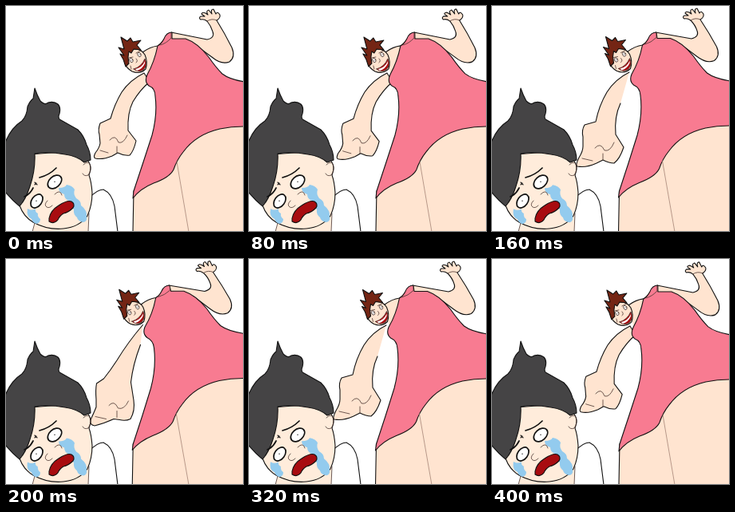
Write an HTML page that moves like this. It is 297 by 282 pixels and loops after 0.48 s.

```html
<!DOCTYPE html>
<html lang="en">
<head>
<meta charset="utf-8">
<style>
html, body { margin: 0; width: 100%; height: 100%; overflow: hidden; background: #fff; }
svg { display: block; width: 100vw; height: 100vh; }
path, ellipse { stroke: #111; stroke-width: 1.1; stroke-linejoin: round; stroke-linecap: round; fill: none; }
.skin { fill: #ffe4d0; }
.pale { fill: #ffecdb; }
.dress { fill: #f87b91; }
.hair { fill: #454445; }
.spikes { fill: #742514; }
.white { fill: #fff; }
.mouth { fill: #a80c10; }
.tear { fill: #93cbee; }
.thin { stroke-width: .8; stroke: #4a3530; }
.soft { stroke-width: .7; stroke: #98786a; }
.flat { stroke: none; }
.bold { stroke-width: 1.7; }
</style>
</head>
<body>
<svg viewBox="0 0 297 282" preserveAspectRatio="none">
  <g id="woman"></g>
  <g id="head">
    <path class="skin" d="M150 58L149 72Q151 78 158 82Q168 86 175 79Q178 70 174 61Q169 53 160 54Z"/>
    <path class="spikes" d="M150 76L147 67L143 60L148 62L141 52L148 54L144 39L152 44L156 40L159 45L169 43L164 49L169 55L160 54L157 59L154 57L153 64L154 72Z"/>
    <path class="mouth thin" d="M160 79Q170 76 174 66Q178 74 172 80Q166 84 160 79Z"/>
    <path class="white flat" d="M162 79Q171 77 174 69L174 72Q171 79 164 81Z"/>
    <ellipse class="white thin" cx="157" cy="68" rx="2" ry="2.8" transform="rotate(-28 157 68)"/>
    <ellipse class="white thin" cx="167" cy="61" rx="2" ry="2.8" transform="rotate(-28 167 61)"/>
    <path class="thin" d="M154 65L159 64M163 59L169 56M163 66Q166 69 163 71M157 68v.3M167 61v.3M156 75L157 79"/>
  </g>
  <g id="man">
    <path class="white" d="M104 241Q114 230 122 230Q133 235 136 251L140 283H101Z"/>
    <path class="pale flat" d="M36 270L33 283H103L104 258Z"/>
    <path class="thin" d="M36 272L33 283M104 260L103 283"/>
    <path class="pale" d="M30 186L17 250Q22 264 34 271Q52 281 72 279Q92 277 102 263Q108 250 108 234Q107 220 104 212Q108 202 104 196L94 181Z"/>
    <path class="thin" d="M97 199Q102 194 105 198Q108 205 103 212Q98 214 96 210"/>
    <path class="hair" d="M-1 171Q6 153 20 144Q26 138 27 126Q30 119 34 116L36 103Q39 112 43 119Q49 125 53 121Q60 119 65 123Q69 127 67 135Q65 139 67 142L90 155Q98 163 101 174Q106 183 106 193L98 196Q89 188 74 186Q53 182 36 185Q37 206 30 226Q25 242 17 251Q8 244-1 233Z"/>
    <g id="tears">
      <path class="tear flat" d="M66 228Q74 228 76 224Q83 225 86 230Q84 236 88 241Q94 244 94 250Q102 256 101 264Q102 270 97 271Q90 270 89 265Q84 261 85 255Q80 250 79 244Q73 242 73 236Q66 234 66 228Z"/>
      <path class="tear flat" d="M27 254Q32 257 37 254Q36 258 40 260Q39 264 43 267Q43 272 38 273Q33 271 32 267Q25 264 27 254Z"/>
    </g>
    <ellipse class="white bold" cx="61" cy="220.500" rx="6.800" ry="10" transform="rotate(48 61 220.500)"/>
    <ellipse class="white bold" cx="38.500" cy="244.500" rx="6.300" ry="9.500" transform="rotate(36 38.500 244.500)"/>
    <path class="bold" d="M42 215Q54 212 63 203M23 239Q30 236 34 228"/>
    <path d="M36 221L39 224M36 224L38 222M61 220v.4M38 244v.4"/>
    <path class="thin" d="M61 236Q68 229 70 237M52 244Q47 249 51 252Q54 254 58 250"/>
    <path class="mouth" d="M54 266Q56 256 66 250Q77 243 82 245Q87 248 84 253Q78 259 72 260Q67 263 65 268Q60 274 54 270Z"/>
  </g>
</svg>
<script>
// Each part: class, then its poses from pulled back to full punch.
const parts = [
  ["skin",
    "M207 33Q232 38 252 42Q262 40 259 32Q257 25 252 19Q248 16 244 17Q241 15 244 13L249 13L245 10Q246 7 250 9L253 11Q250 6 254 5L258 10Q256 4 260 4L263 10Q265 6 268 11Q269 15 264 18Q274 34 283 52Q288 64 280 70Q270 74 258 64L236 48L207 41Z",
    "M203 33Q229 37 248 40Q258 37 255 30Q252 22 246 17Q241 14 238 15Q235 13 238 11L243 11L239 8Q240 5 244 7L247 9Q244 4 248 3L252 8Q250 2 254 2L257 8Q259 4 262 9Q263 13 258 16Q270 33 280 50Q285 61 277 67Q267 71 255 62L234 46L205 40Z"],
  ["skin flat",
    "M171 58Q181 51 190 50L202 36V65L179 92Z",
    "M168 57Q178 49 187 48L199 35V65L176 90Z"],
  ["", "M171 58Q181 51 190 50Q197 46 202 36", "M168 57Q178 49 187 48Q194 45 199 35"],
  ["skin",
    "M173 84Q155 93 145 108Q136 123 131 141L118 147Q115 155 117 161L118 172Q117 178 112 184Q109 190 112 191Q121 193 133 188L140 184Q148 188 155 187Q160 182 163 169L153 156Q152 134 159 120Q168 105 180 95Z",
    "M172 83Q154 92 144 108Q134 125 130 145L116 149Q112 156 114 164L114 176Q114 182 109 190Q104 200 107 201Q118 203 131 197L139 193Q147 197 153 197Q160 192 165 177L155 161Q153 139 161 122Q169 106 179 95Z",
    "M171 82L152 116L134 146Q128 154 115 155Q111 163 112 172L112 188Q112 195 107 202Q103 213 104 215Q115 217 131 208L139 204Q146 210 152 210Q159 204 164 188L155 177Q158 148 165 126L176 93Z"],
  ["thin",
    "M130 168Q137 160 141 171Q147 173 152 162M139 184L139 176M118 181L128 184",
    "M129 178Q136 170 141 181Q148 183 153 171M139 193L139 185M113 191L126 194",
    "M129 189Q135 182 140 193Q148 196 154 185M139 204L139 196M111 204L125 207"],
  ["skin",
    "M160 232L159 284H299V146H215Z",
    "M159 232L158 284H299V145H213Z"],
  ["dress",
    "M208 33Q201 33 198 41Q195 47 190 50Q186 70 177 86Q173 95 179 100Q187 103 187 113Q190 136 183 162Q172 196 160 232L159 241Q168 229 185 222Q205 215 210 205Q214 193 222 183Q238 161 268 154Q283 151 299 151V95Q280 92 271 85Q263 77 254 64Q240 46 225 41L208 41Z",
    "M204 33Q197 33 194 40Q191 46 187 48Q183 69 173 85Q170 93 176 98Q184 102 185 111Q188 135 181 162Q171 196 159 232L158 239Q167 228 184 221Q204 213 209 203Q213 191 221 181Q237 159 267 152Q282 149 299 149V93Q278 90 268 83Q260 75 251 62Q237 45 222 40L206 40Z"],
  ["thin", "M193 49Q201 47 207 40V34", "M190 47Q198 45 205 39V33"],
  ["soft", "M214 195L229 283", "M213 193L229 283"],
  ["thin", "M252 19Q258 15 264 18", "M246 17Q252 13 258 16"]
];

// Start time in ms, punch amount.
const steps = [[0, 0], [80, .04], [120, .27], [160, .5], [200, .75], [240, 1], [320, .5], [400, .04]];
const loop = 480;
const $ = id => document.getElementById(id);

const shapes = parts.map(([name, ...poses]) => {
  const node = document.createElementNS("http://www.w3.org/2000/svg", "path");
  node.setAttribute("class", name);
  $("woman").append(node);
  return { node, poses };
});

function mix(a, b, t) {
  const ends = b.match(/-?[\d.]+/g);
  let i = 0;
  return a.replace(/-?[\d.]+/g, n => (+n + (ends[i++] - n) * t).toFixed(2));
}

function pose(amount) {
  for (const { node, poses } of shapes) {
    const place = amount * (poses.length - 1);
    const i = Math.min(Math.floor(place), poses.length - 2);
    node.setAttribute("d", mix(poses[i], poses[i + 1], place - i));
  }
  $("head").setAttribute("transform", `translate(${-3 * amount} ${-amount})`);
  $("tears").setAttribute("transform", `translate(0 ${amount * .7})`);
}

let shown;
function draw(now) {
  const time = now % loop;
  const amount = steps.findLast(([start]) => start <= time)[1];
  if (amount !== shown) pose(shown = amount);
  requestAnimationFrame(draw);
}
pose(0);
requestAnimationFrame(draw);
</script>
</body>
</html>
```
